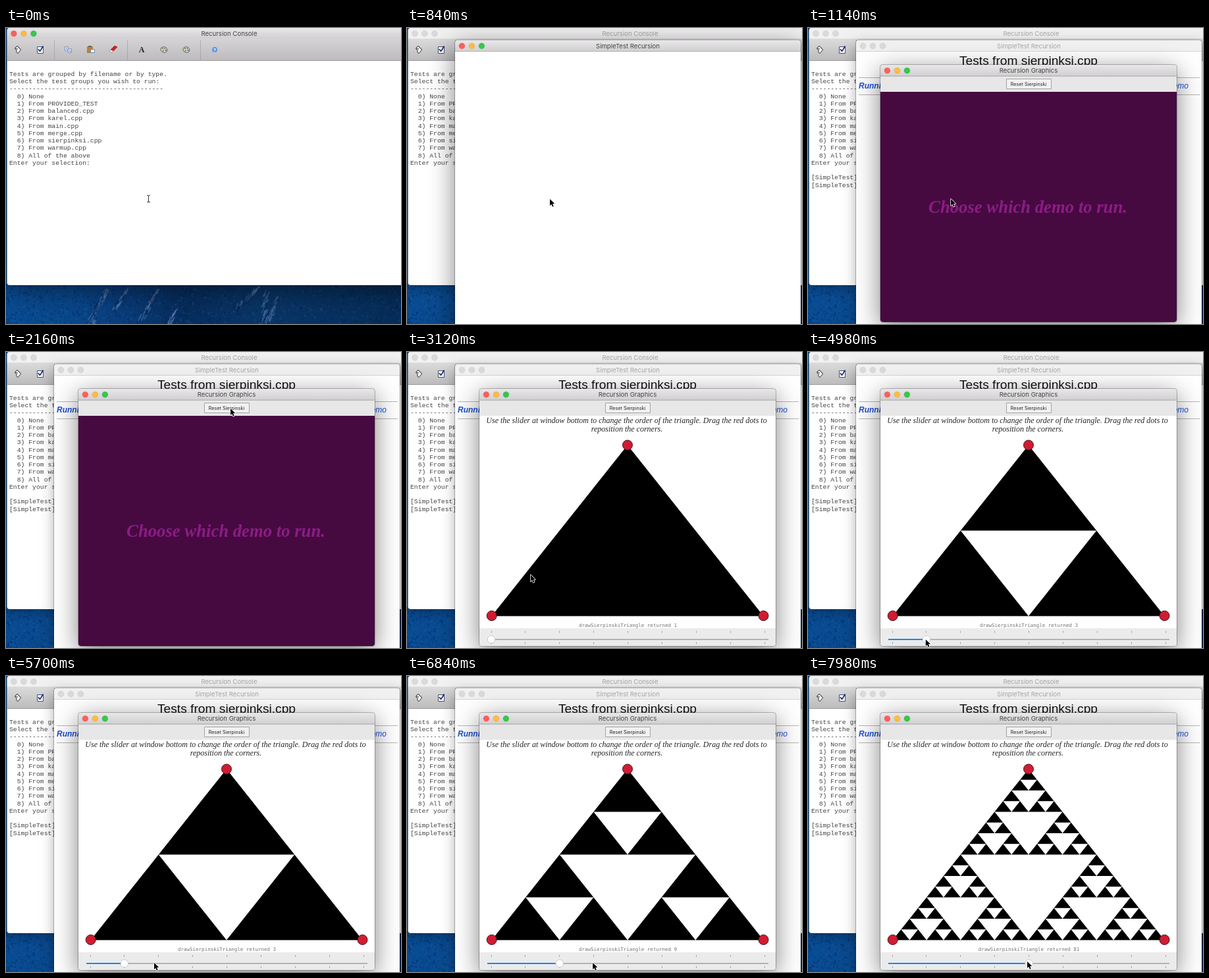
An HTML page with a canvas that plays this animation: 600x450 px, repeating every 8 s.

```html
<!DOCTYPE html>
<html lang="en">
<head>
<meta charset="utf-8">
<title>Recursion demo</title>
<style>
html, body { margin: 0; width: 100%; height: 100%; overflow: hidden; background: #0a3f7c; }
canvas { display: block; width: 600px; height: 450px; }
</style>
</head>
<body>
<canvas id="stage" width="600" height="450"></canvas>
<script>
const LOOP = 8000;
const UI = 'Inter, Roboto, sans-serif';
const SANS = '"Liberation Sans", Arial, sans-serif';
const SERIF = '"Liberation Serif", Times, serif';
const MONO = '"Liberation Mono", Courier, monospace';

const canvas = document.getElementById('stage');
let c = canvas.getContext('2d');

const WINDOW_OPEN = 760, TEST_TEXT = 900, GRAPHICS_OPEN = 1010, TRIANGLE = 2520;
const ORDER_TIMES = [4600, 5800, 6900, 7740];

// time, x, y of the pointer
const PATH = [
  [0, 217, 260], [1180, 217, 260], [1700, 336, 97], [2100, 341, 86],
  [2600, 341, 86], [3300, 158, 388], [3640, 142, 411], [4200, 142, 411],
  [4540, 177, 437], [5100, 179, 437], [5620, 225, 436], [5760, 225, 436],
  [6000, 234, 437], [6340, 245, 436], [6640, 281, 436], [7000, 283, 436],
  [7640, 330, 435], [7760, 333, 434], [8000, 333, 434]
];

const MENU = [
  'Tests are grouped by filename or by type.',
  'Select the test groups you wish to run:',
  '-'.repeat(40),
  ...['None', 'From PROVIDED_TEST', 'From balanced.cpp', 'From karel.cpp', 'From main.cpp',
    'From merge.cpp', 'From sierpinksi.cpp', 'From warmup.cpp', 'All of the above']
    .map((s, i) => `  ${i}) ${s}`)
];

function text(s, x, y, font, color, align = 'left') {
  c.font = font;
  c.fillStyle = color;
  c.textAlign = align;
  c.fillText(s, x, y);
}

function rect(x, y, w, h, color) {
  c.fillStyle = color;
  c.fillRect(x, y, w, h);
}

function box(x, y, w, h, fill, stroke) {
  rect(x, y, w, h, fill);
  c.strokeStyle = stroke;
  c.lineWidth = 1;
  c.strokeRect(x, y, w, h);
}

function shade(y, h, top, bottom) {
  const g = c.createLinearGradient(0, y, 0, y + h);
  g.addColorStop(0, top);
  g.addColorStop(1, bottom);
  return g;
}

function disc(x, y, r, fill, stroke, width = 1) {
  c.beginPath();
  c.arc(x, y, r, 0, Math.PI * 2);
  c.fillStyle = fill;
  c.fill();
  if (stroke) {
    c.strokeStyle = stroke;
    c.lineWidth = width;
    c.stroke();
  }
}

function line(x1, y1, x2, y2, color, width = 1) {
  c.beginPath();
  c.moveTo(x1, y1);
  c.lineTo(x2, y2);
  c.strokeStyle = color;
  c.lineWidth = width;
  c.stroke();
}

function poly(points, fill, stroke, width = 1) {
  c.beginPath();
  points.forEach(([x, y], i) => i ? c.lineTo(x, y) : c.moveTo(x, y));
  c.closePath();
  if (stroke) {
    c.strokeStyle = stroke;
    c.lineWidth = width;
    c.lineJoin = 'round';
    c.stroke();
  }
  c.fillStyle = fill;
  c.fill();
}

function makeWallpaper() {
  const layer = document.createElement('canvas');
  layer.width = 600;
  layer.height = 450;
  const main = c;
  c = layer.getContext('2d');
  let seed = 11;
  const rnd = () => (seed = (seed * 16807) % 2147483647) / 2147483647;
  const base = c.createLinearGradient(0, 0, 600, 0);
  [[0, '#084c94'], [.18, '#08468a'], [.3, '#083b78'], [.45, '#062c5c'], [.65, '#083566'], [1, '#062c58']]
    .forEach(([at, color]) => base.addColorStop(at, color));
  rect(0, 0, 600, 450, base);

  // Rock grain: short dabs in all directions, fewer to the right.
  for (let i = 0; i < 1500; i++) {
    const x = 600 * rnd() ** 1.3, y = 388 + rnd() * 64, a = rnd() * 6.3, len = 1 + rnd() * 4;
    const tone = rnd() < .55 ? 'rgba(3,28,70,.28)' : 'rgba(45,105,175,.2)';
    line(x, y, x + Math.cos(a) * len, y + Math.sin(a) * len, tone, .8 + rnd() * 1.8);
  }
  // Ridges: top x, top y, bottom x, bottom y, spread.
  const ridges = [[156, 392, 128, 450, 10], [188, 392, 166, 425, 5], [232, 395, 208, 440, 7],
    [262, 425, 246, 450, 6], [398, 398, 392, 450, 9], [384, 392, 350, 425, 7], [415, 405, 402, 440, 5]];
  for (const [x1, y1, x2, y2, spread] of ridges) {
    for (let i = 0; i < spread * 5; i++) {
      const a = rnd(), j = (rnd() - .5) * spread * (.6 + a);
      const x = x1 + (x2 - x1) * a + j, y = y1 + (y2 - y1) * a, len = 3 + rnd() * 8;
      line(x, y, x - len * .5, y + len, rnd() < .7 ? 'rgba(110,145,200,.38)' : 'rgba(4,26,62,.5)', .6 + rnd() * 1.6);
    }
  }
  c = main;
  return layer;
}

function frame(x, y, w, h, titleH, title, active, fill) {
  c.save();
  c.shadowColor = active ? 'rgba(0,0,0,.5)' : 'rgba(0,0,0,.3)';
  c.shadowBlur = active ? 38 : 20;
  c.shadowOffsetY = active ? 9 : 5;
  c.beginPath();
  c.roundRect(x, y, w, h, 4);
  c.fillStyle = fill;
  c.fill();
  c.restore();

  c.save();
  c.beginPath();
  c.roundRect(x, y, w, h, 4);
  c.clip();
  rect(x, y, w, titleH, active ? shade(y, titleH, '#e9e7e9', '#d0ced0') : '#f1f1f1');
  rect(x, y + titleH - 1, w, 1, active ? '#b4b2b4' : '#d6d6d6');
  c.restore();

  c.beginPath();
  c.roundRect(x - .5, y - .5, w + 1, h + 1, 4);
  c.strokeStyle = 'rgba(0,0,0,.25)';
  c.lineWidth = 1;
  c.stroke();

  const cy = y + titleH / 2;
  ['#fc605b', '#fdbc40', '#34c84a'].forEach((color, i) =>
    disc(x + 10.4 + i * 15, cy, 4.5, active ? color : '#dadada', active ? 'rgba(0,0,0,.12)' : '#cfcfcf', .6));
  text(title, x + w / 2, cy + 3.6, '9.6px ' + UI, active ? '#444' : '#a6a6a6', 'center');
}

function palette(x) {
  c.save();
  c.translate(x, 33);
  c.rotate(.35);
  c.beginPath();
  c.ellipse(0, 0, 5, 4.2, 0, 0, 7);
  c.fillStyle = '#d8dccb';
  c.fill();
  c.strokeStyle = '#4c5a50';
  c.lineWidth = .9;
  c.stroke();
  disc(-2.4, -1, 1.1, '#3b8a4a');
  disc(.6, -2, 1.1, '#c95a3a');
  disc(2.8, 0, 1.1, '#3d63b0');
  disc(-.6, 1.8, 1, '#555');
  c.restore();
}

function toolbarIcons() {
  for (const x of [73, 184, 295]) {
    for (let y = 19; y < 48; y += 2) rect(x, y, 1, 1, '#8c8c8c');
  }
  poly([[14, 31], [17, 28], [22, 33], [18, 38], [16, 36], [17, 34]], '#f4f4f4', '#444', 1.8);
  line(14, 31, 18, 32, '#444');

  box(47.5, 28.5, 9, 10, '#fff', '#44506a');
  line(49, 32, 51.5, 35.5, '#1d2f78', 1.8);
  line(51.5, 35.5, 56.5, 27.5, '#1d2f78', 1.8);

  for (const [x, y] of [[89.5, 28.5], [94.5, 31.5]]) {
    box(x, y, 5, 6, '#f0f5ff', '#7d94b8');
    rect(x + 1.5, y + 1.5, 2, 1, '#4f86cc');
    rect(x + 1.5, y + 3.5, 3, 1, '#4f86cc');
  }

  rect(123, 28, 9, 10, '#b98236');
  rect(125, 27, 5, 2, '#666');
  box(128.5, 32.5, 6, 5, '#eef3fc', '#6f89ae');

  poly([[158, 34], [165, 27], [169, 29], [162, 36]], '#cf2028', '#6d1a1e', .8);
  poly([[157, 35], [159, 33], [163, 35], [161, 37.5]], '#f4e4e4', '#6d1a1e', .6);

  text('A', 206, 37, 'bold 12px ' + SERIF, '#222', 'center');
  palette(240);
  palette(274);
  disc(317, 33, 4.6, '#5b8fd4', '#b9cbe4', 1.4);
  text('?', 317, 35.8, 'bold 8px ' + SANS, '#fff', 'center');
}

function consoleWindow(t) {
  const active = t < WINDOW_OPEN;
  frame(1.5, 0, 675, 391, 17, 'Recursion Console', active, '#fff');
  rect(2, 16, 598, 33, shade(16, 33, active ? '#d5d3d5' : '#dcdcdc', '#bdbbbd'));
  rect(2, 49, 598, 1, '#9d9b9d');
  toolbarIcons();
  const row = (s, i) => text(s, 5, Math.round(72.8 + i * 11.25), '9.75px ' + MONO, '#444');
  MENU.forEach(row);
  row('Enter your selection: ' + (t > 420 ? '6' : ''), 12);
  if (t >= TEST_TEXT) {
    row('[SimpleTest] Running tests', 14);
    row('[SimpleTest] Please wait', 15);
  }
}

function testWindow(t) {
  const active = t < GRAPHICS_OPEN;
  frame(73, 18.5, 525, 460, 17.5, 'SimpleTest Recursion', active, '#fff');
  if (t < TEST_TEXT) return;
  text('Tests from sierpinksi.cpp', 335, 56, '19.2px ' + SANS, '#111', 'center');
  rect(77, 75, 518, 1, '#b5b5b5');
  rect(77, 101, 518, 1, '#b5b5b5');
  text('Running test:', 77, 92, 'italic bold 12px ' + SANS, '#1a4fd6');
  text('Sierpinski demo', 578, 92, 'italic 12px ' + SANS, '#1a4fd6', 'right');
}

function sierpinski(x, y, w, h, order) {
  if (order === 0) {
    c.moveTo(x, y);
    c.lineTo(x - w / 2, y + h);
    c.lineTo(x + w / 2, y + h);
    c.closePath();
    return;
  }
  sierpinski(x, y, w / 2, h / 2, order - 1);
  sierpinski(x - w / 4, y + h / 2, w / 2, h / 2, order - 1);
  sierpinski(x + w / 4, y + h / 2, w / 2, h / 2, order - 1);
}

function slider(order) {
  rect(110, 420, 450, 27, '#ebebeb');
  const tick = i => 128 + i * 51.9;
  for (let i = 0; i < 9; i++) {
    const x = Math.floor(tick(i));
    rect(x, 424, 1, 3, '#a5a5a5');
    rect(x, 441, 1, 3, '#a5a5a5');
  }
  const x = tick(order);
  rect(122, 436, 427, 2, '#b3b3b3');
  if (order) rect(122, 436, x - 122, 2, '#1388f8');
  disc(x, 437, 5.8, '#fff', '#c2c2c2', .8);
}

function trianglePane(t) {
  const order = ORDER_TIMES.filter(at => t >= at).length;
  rect(110, 97, 450, 323, '#fff');
  const font = 'italic 12px ' + SERIF;
  text('Use the slider at window bottom to change the order of the triangle. Drag the red dots to',
    333.5, 107.5, font, '#262626', 'center');
  text('reposition the corners.', 334, 121, font, '#262626', 'center');
  c.beginPath();
  sierpinski(335, 141.5, 413, 260, order);
  c.fillStyle = '#000';
  c.fill();
  for (const [x, y] of [[335, 141.5], [128.7, 401], [541.5, 401]]) disc(x, y, 7.5, '#d01c32', '#48141c', 1);
  text('drawSierpinskiTriangle returned ' + 3 ** order, 335.5, 418,
    '7.5px "DejaVu Sans Mono", monospace', '#747474', 'center');
  slider(order);
}

function graphicsWindow(t) {
  frame(110, 56, 450, 391, 17.5, 'Recursion Graphics', true, '#ebebeb');
  rect(110, 73, 450, 24, '#e7e7e7');
  rect(110, 73, 450, 1, '#bdbdbd');
  box(301.5, 77.5, 68, 15, '#f1f1f1', '#a3a3a3');
  text('Reset Sierpinski', 335, 88, '7.2px ' + UI, '#222', 'center');
  c.save();
  c.beginPath();
  c.roundRect(110, 97, 450, 350, [0, 0, 4, 4]);
  c.clip();
  if (t < TRIANGLE) {
    rect(110, 97, 450, 350, '#460a40');
    text('Choose which demo to run.', 334, 281, 'italic bold 26.7px ' + SERIF, '#8c1c86', 'center');
  } else {
    trianglePane(t);
  }
  c.restore();
}

function pointerAt(t) {
  let i = 1;
  while (i < PATH.length - 1 && t >= PATH[i][0]) i++;
  const [t0, x0, y0] = PATH[i - 1], [t1, x1, y1] = PATH[i];
  const u = Math.min(1, (t - t0) / (t1 - t0));
  const e = u * u * (3 - 2 * u);
  return [x0 + (x1 - x0) * e, y0 + (y1 - y0) * e];
}

function pointer(t) {
  const [x, y] = pointerAt(t);
  if (t < WINDOW_OPEN) {
    const mid = x - .5;
    line(mid, y - 5, mid, y + 5, '#333');
    for (const s of [-1, 1]) {
      line(mid, y - 5, mid + s * 2.5, y - 6, '#333');
      line(mid, y + 4, mid + s * 2.5, y + 5, '#333');
    }
    return;
  }
  const arrow = [[0, 0], [0, 10], [2.3, 7.9], [4, 11.8], [5.7, 11], [4.1, 7.3], [7.2, 7.1]];
  poly(arrow.map(([dx, dy]) => [x + dx, y + dy]), '#000', '#fff', 1.5);
}

// Windows fade in while growing slightly.
function popIn(t, start, cx, cy, draw) {
  if (t < start) return;
  const u = Math.min(1, (t - start) / 75), k = .9 + .1 * u;
  c.save();
  c.globalAlpha = .3 + .7 * u;
  c.translate(cx, cy);
  c.scale(k, k);
  c.translate(-cx, -cy);
  draw(t);
  c.restore();
}

const wallpaper = makeWallpaper();

function draw() {
  const t = performance.now() % LOOP;
  c.drawImage(wallpaper, 0, 0);
  consoleWindow(t);
  popIn(t, WINDOW_OPEN, 335, 250, testWindow);
  popIn(t, GRAPHICS_OPEN, 335, 252, graphicsWindow);
  pointer(t);
  requestAnimationFrame(draw);
}
draw();
</script>
</body>
</html>
```
